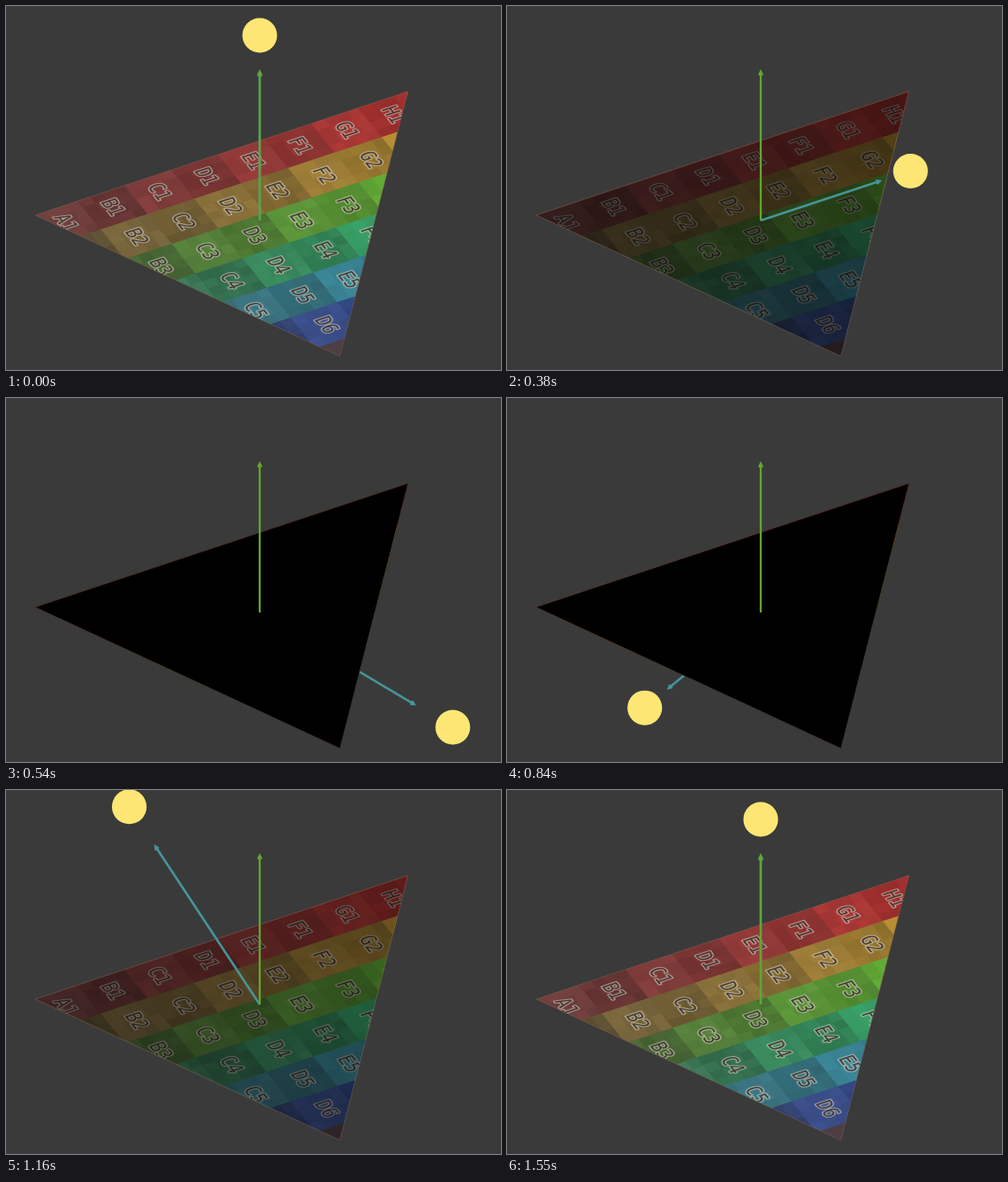
An HTML page with a canvas that plays this animation: 556x409 px, repeating every 1.82 s.

```html
<!DOCTYPE html>
<html lang="en">
<head>
<meta charset="utf-8">
<title>Light over a triangle</title>
<style>
  html, body { margin: 0; width: 100%; height: 100%; overflow: hidden; background: #3a3a3a; }
  canvas { display: block; }
</style>
</head>
<body>
<canvas id="stage" width="556" height="409"></canvas>
<script>
const W = 556, H = 409, LOOP = 1820;
const ctx = document.getElementById('stage').getContext('2d');
const origin = { x: 285, y: 241 };
const corners = [[33, 235], [451.5, 96], [375, 393.5]];

// Start time in ms and light angle in degrees for each held pose.
const poses = [
  [0, 0], [70, 6], [150, 13], [230, 22.2], [310, 34], [380, 50.2], [460, 72],
  [540, 98], [610, 126], [690, 156], [770, 186], [840, 216.5], [940, 240],
  [1010, 262], [1090, 285], [1160, 318], [1240, 332], [1310, 343],
  [1390, 351], [1470, 357], [1550, 360]
];

function trianglePath(c) {
  c.beginPath();
  corners.forEach(([x, y]) => c.lineTo(x, y));
  c.closePath();
}

function noise(n) {
  const v = Math.sin(n * 127.1 + 11.7) * 43758.5453;
  return v - Math.floor(v);
}

// Colour grid: numbers run along x, letters run up along y.
function makeGrid() {
  const hues = [1, 41, 97, 147, 191, 225];
  const canvas = document.createElement('canvas');
  canvas.width = W;
  canvas.height = H;
  const c = canvas.getContext('2d');
  trianglePath(c);
  c.clip();
  c.fillStyle = '#4f3d44';
  c.fillRect(0, 0, W, H);

  const cells = [];
  hues.forEach((hue, row) => {
    for (let col = 0; col < 9; col++) cells.push({ hue, row, col });
  });
  const place = (col, row) =>
    c.setTransform(27, 33.4, -52.6, 17.3, 28 + 27 * row + 52.6 * col, 235 + 33.4 * row - 17.3 * col);

  for (const { hue, row, col } of cells) {
    const sat = 29 + 3.8 * col;
    const light = 31 + 1.6 * col + ((row + col) % 2 ? -2.5 : 2.5);
    place(col, row);
    c.fillStyle = `hsl(${hue} ${sat}% ${light}%)`;
    c.fillRect(-0.01, -1.01, 1.03, 1.03);
    for (let i = 0; i < 16; i++) {
      const d = noise(row * 200 + col * 17 + i) * 4 - 2;
      c.fillStyle = `hsl(${hue} ${sat}% ${light + d}%)`;
      c.fillRect((i % 4) / 4, -1 + Math.floor(i / 4) / 4, 0.26, 0.26);
    }
  }

  c.font = '0.42px "DejaVu Sans Mono", monospace';
  c.textAlign = 'center';
  c.lineJoin = 'round';
  c.lineWidth = 0.06;
  c.strokeStyle = 'rgba(220, 210, 196, .55)';
  c.fillStyle = 'rgba(42, 36, 32, .8)';
  for (const { row, col } of cells) {
    if (col > 7) continue;
    const label = 'ABCDEFGH'[col] + (row + 1);
    place(col, row);
    c.strokeText(label, 0.5, -0.35);
    c.fillText(label, 0.5, -0.35);
  }
  return canvas;
}

const grid = makeGrid();

function arrow(x, y, color, width) {
  const dx = x - origin.x, dy = y - origin.y;
  const len = Math.hypot(dx, dy);
  ctx.save();
  ctx.translate(origin.x, origin.y);
  ctx.rotate(Math.atan2(dy, dx));
  ctx.fillStyle = color;
  ctx.fillRect(0, -width / 2, len - 5, width);
  ctx.beginPath();
  ctx.moveTo(len, 0);
  ctx.lineTo(len - 6, -3);
  ctx.lineTo(len - 8, 0);
  ctx.lineTo(len - 6, 3);
  ctx.fill();
  ctx.restore();
}

function drawLight(s, c) {
  const dx = 219 * s, dy = 101 * s - 208 * c;
  arrow(origin.x + dx * 0.81, origin.y + dy * 0.81, '#469499', 2.6);
  ctx.fillStyle = '#fde674';
  ctx.beginPath();
  ctx.arc(origin.x + dx, origin.y + dy, 19.5, 0, Math.PI * 2);
  ctx.fill();
}

function drawTriangle(level) {
  ctx.drawImage(grid, 0, 0);
  trianglePath(ctx);
  ctx.fillStyle = `rgba(0, 0, 0, ${1 - level})`;
  ctx.fill();
  ctx.lineWidth = 1;
  ctx.strokeStyle = level ? 'rgba(128, 96, 80, .5)' : 'rgba(70, 38, 24, .5)';
  ctx.stroke();
}

function draw(angle) {
  const a = angle * Math.PI / 180;
  const s = Math.sin(a), c = Math.cos(a);
  const below = c < 0;
  ctx.fillStyle = '#3a3a3a';
  ctx.fillRect(0, 0, W, H);
  if (below) drawLight(s, c);
  drawTriangle(Math.max(0, c) ** 1.8);
  if (!below) drawLight(s, c);
  arrow(origin.x, 71, '#62a530', 2.3);
}

function frame(now) {
  const t = now % LOOP;
  let i = poses.length - 1;
  while (poses[i][0] > t) i--;
  draw(poses[i][1]);
}

const start = performance.now();
function tick(now) {
  frame(Math.max(0, now - start));
  requestAnimationFrame(tick);
}

frame(0);
requestAnimationFrame(tick);
</script>
</body>
</html>
```
